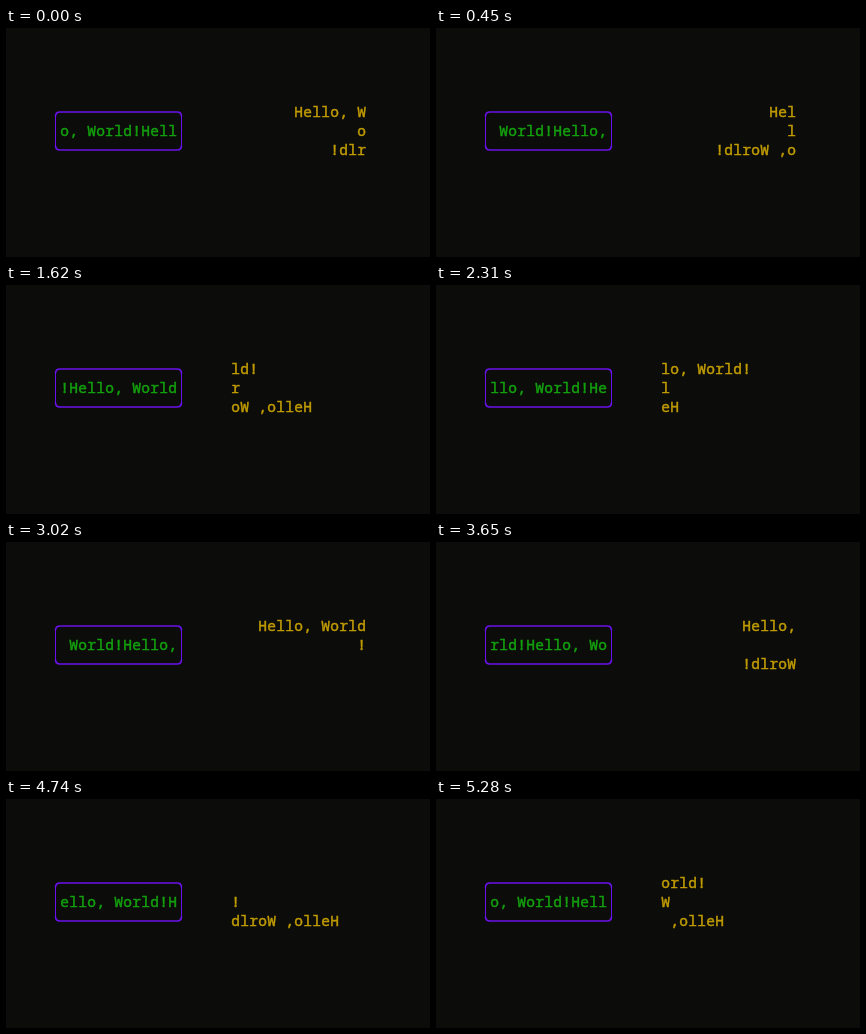
Recreate the animation shown at these times as an HTML page. Size 424 px wide and 229 px high, loop 5.36 s.

```html
<!DOCTYPE html>
<html lang="en">
<head>
<meta charset="utf-8">
<title>Terminal marquees</title>
<style>
  html, body { margin: 0; width: 100%; height: 100%; overflow: hidden; background: #0c0c0a; }
  svg { display: block; width: 100vw; height: 100vh; }
  text {
    font: 500 14.5px "Noto Sans Mono", "DejaVu Sans Mono", monospace;
    text-anchor: middle;
    stroke: currentColor;
    stroke-width: 0.45px;
    fill: currentColor;
  }
</style>
</head>
<body>
<svg viewBox="0 0 424 229">
  <rect width="424" height="229" fill="#0c0c0a"/>
  <g fill="none" stroke="#6a10ea">
    <path d="M49.5 88V118M175.5 88V118"/>
    <path stroke-width="1.6" d="M49.5 88.5Q49.5 84 54 84H171Q175.5 84 175.5 88.5M49.5 117.5Q49.5 122 54 122H171Q175.5 122 175.5 117.5"/>
  </g>
  <g id="ticker" color="#13a10e"></g>
  <g id="ring" color="#c19c00"></g>
</svg>
<script>
const LOOP = 5360;
const MSG = "Hello, World!";
const CELL = 9, ROW = 19, BASE = 89;
const COLS = 15, PERIMETER = 2 * COLS + 2;

function makeGlyphs(id) {
  const group = document.getElementById(id);
  return [...MSG].map(ch => {
    const el = document.createElementNS("http://www.w3.org/2000/svg", "text");
    el.textContent = ch;
    return group.appendChild(el);
  });
}

function place(el, left, col, row) {
  el.setAttribute("x", left + (col + 0.5) * CELL);
  el.setAttribute("y", BASE + row * ROW);
}

// Clockwise cell on the three-row ring, from the top left
function ringCell(i) {
  if (i < COLS) return [i, 0];
  if (i === COLS) return [COLS - 1, 1];
  if (i <= 2 * COLS) return [2 * COLS - i, 2];
  return [0, 1];
}

const ticker = makeGlyphs("ticker");
const ring = makeGlyphs("ring");

// Each text steps one cell at a time on its own clock
function draw(t) {
  const shift = 4 + Math.floor((t + 140) / 208);
  const head = 7 + Math.floor((t + 106) / 108.5);
  const len = MSG.length;
  ticker.forEach((el, i) => place(el, 54, (i - shift % len + len) % len, 1));
  ring.forEach((el, i) => place(el, 225, ...ringCell((head + i) % PERIMETER)));
}

const start = performance.now();
function tick() {
  draw((performance.now() - start) % LOOP);
  requestAnimationFrame(tick);
}
tick();
</script>
</body>
</html>
```
